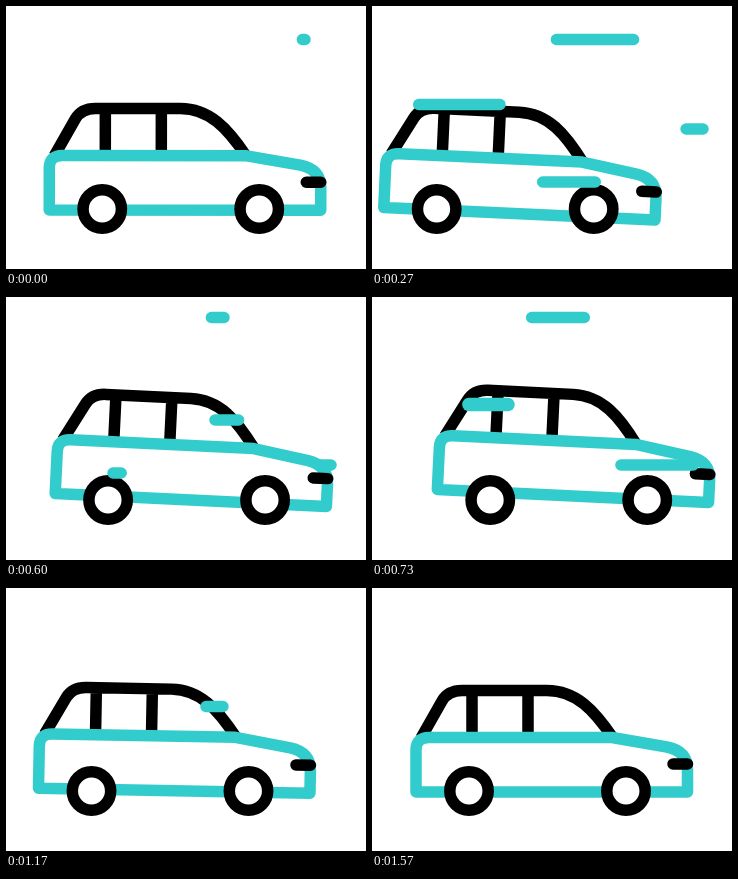
An HTML page for the animation above (1670 ms loop, 360 px wide and 263 px high).

```html
<!DOCTYPE html>
<html lang="en">
<head>
<meta charset="utf-8">
<title>Car in the wind</title>
<style>
  html, body { margin: 0; width: 100%; height: 100%; overflow: hidden; background: #fff; }
  svg { display: block; width: 100vw; height: 100vh; }
  path, circle, line { fill: none; stroke-width: 11.5; stroke-linejoin: round; }
  .black { stroke: #000; }
  .teal, #wind { stroke: #3cc; }
  .wheel { fill: #fff; }
  .light, #wind { stroke-linecap: round; }
</style>
</head>
<body>
<svg viewBox="0 0 360 263">
  <g id="body">
    <path class="black" d="M49 150 L70 113 Q76 102.5 90 102.5 H175 C204 102.5 222 122 241 150 M100 103 V148 M156 103 V148"/>
    <path class="teal" d="M44 204 V162 Q44 149.5 57 149.5 H240 L295 159 Q315 163 315.5 181 V204 Z"/>
    <path class="black light" d="M301 176 H315.5"/>
  </g>
  <g id="wheels">
    <circle class="black wheel" cx="97" cy="203" r="19.2"/>
    <circle class="black wheel" cx="254" cy="203" r="19.2"/>
  </g>
  <g id="wind"></g>
</svg>
<script>
const LOOP = 1670, STEP = 1000 / 30, LAST = 48;
const REACH = 122, LAG = 5, FAST = 10.7, SLOW = 14.4;

const $ = id => document.getElementById(id);

// Cosine ease from 0 to 1 between two steps.
function ease(s, from, to) {
  const p = Math.min(1, Math.max(0, (s - from) / (to - from)));
  return (1 - Math.cos(Math.PI * p)) / 2;
}

// The car drops back, surges ahead, drops back a little and settles.
const drive = s => -34 * ease(s, 0, 10.5) + 56 * ease(s, 10.5, 24)
  - 34 * ease(s, 24, 37) + 12 * ease(s, 37, 48);
const bounce = s => 4.8 * ease(s, 0, 13) - 10 * ease(s, 13, 24) + 5.2 * ease(s, 24, 42);
const tilt = s => 2.75 * (ease(s, 0, 10.5) - ease(s, 28, 42));

// Every gust runs left over the same reach; its tail follows its head after a lag.
function gust(y, x, start, span = FAST, width = 11.5) {
  const line = document.createElementNS("http://www.w3.org/2000/svg", "line");
  line.setAttribute("y1", y);
  line.setAttribute("y2", y);
  line.style.strokeWidth = width;
  $("wind").append(line);
  return s => {
    const head = x - REACH * ease(s, start, start + span);
    const tail = x - REACH * ease(s, start + LAG, start + LAG + span);
    line.setAttribute("x1", head);
    line.setAttribute("x2", tail);
    line.setAttribute("visibility", tail - head > 1 ? "visible" : "hidden");
  };
}

const gusts = [
  gust(33.5, 299, 0),
  gust(98.5, 153, 0.8),
  gust(176, 229, 2, SLOW),
  gust(123, 331, 6.4),
  gust(20.5, 218, 16, SLOW),
  gust(107.5, 136, 18.9, FAST, 13.5),
  gust(168, 325, 16.8),
  gust(118.5, 322, 22.9)
];

function draw(ms) {
  const s = Math.min(LAST, Math.floor((ms % LOOP + 5) / STEP) + 1);
  const x = drive(s);
  $("wheels").setAttribute("transform", `translate(${x} 0)`);
  $("body").setAttribute("transform",
    `translate(${x} ${bounce(s)}) rotate(${tilt(s)} 180 203)`);
  gusts.forEach(blow => blow(s));
}

const start = performance.now();
function tick() {
  draw(performance.now() - start);
  requestAnimationFrame(tick);
}
tick();
</script>
</body>
</html>
```
